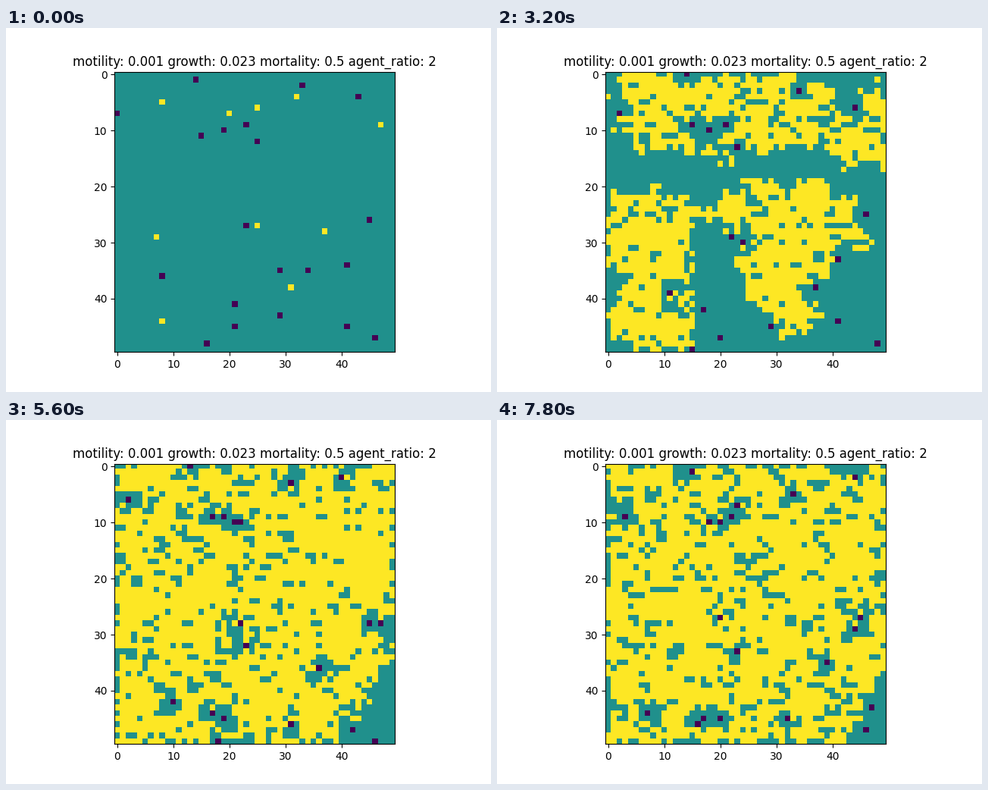
Recreate the animation shown at these times as a matplotlib script. Size 640 by 480 pixels, loop 8 s.

```python
import matplotlib.pyplot as plt
import numpy as np
from matplotlib.animation import FuncAnimation

SIZE, FRAMES, INTERVAL = 50, 40, 200
TITLE = "motility: 0.001 growth: 0.023 mortality: 0.5 agent_ratio: 2"

# Starting places (x, y)
FOUNDERS = [(8, 5), (32, 4), (25, 6), (20, 7), (47, 9),
            (25, 27), (37, 28), (7, 29), (31, 38), (8, 44)]
AGENTS = [(0, 7), (14, 1), (33, 2), (43, 4), (15, 11), (19, 10), (25, 12),
          (23, 9), (23, 27), (45, 26), (29, 35), (34, 35), (29, 43), (8, 36),
          (41, 34), (21, 41), (21, 45), (16, 48), (41, 45), (46, 47)]

SPREAD = 0.24        # chance that one neighbour fills an empty site
DEATH = 0.1
PAIR_DEATH = 0.4     # chance that a death takes the cell beside it too
EDGE_DEATH = 0.2
STEP = 0.28          # chance that an agent moves along an axis
SETTLE = 8           # founders survive until this step

rng = np.random.default_rng(11)
ys, xs = np.mgrid[:SIZE, :SIZE]


def chance(p):
    return rng.random((SIZE, SIZE)) < p


def distances(points):
    return np.min([np.hypot(xs - x, ys - y) for x, y in points], axis=0)


def wander(agents):
    moves = rng.choice([-1, 0, 1], agents.shape, p=[STEP / 2, 1 - STEP, STEP / 2])
    return np.clip(agents + moves, 0, SIZE - 1)


def neighbours(cells):
    p = np.pad(cells.astype(int), 1)
    return sum(p[dy:dy + SIZE, dx:dx + SIZE]
               for dy in range(3) for dx in range(3) if (dy, dx) != (1, 1))


def grow(cells, t):
    reach = 19 * (1 - np.exp(-t / 22)) + 0.3
    fill = chance(1 - (1 - SPREAD) ** neighbours(cells))
    return cells | (fill & (range_needed < reach))


def decay(cells):
    dead = chance(DEATH)
    dead[:, 1:] |= dead[:, :-1] & chance(PAIR_DEATH)[:, 1:]
    return cells & ~dead & ~(border & chance(EDGE_DEATH))


def hunt(cells, agents):
    d = distances(agents)
    return cells & ~chance(np.where(d < 1.5, 0.65, np.where(d < 2.3, 0.3, 0)))


def simulate():
    agents = np.array(AGENTS)
    cells = founders.copy()
    grids = []
    for t in range(FRAMES):
        if t > 0:
            agents = wander(agents)
            cells = hunt(decay(grow(cells, t)), agents)
        if t < SETTLE:
            cells |= founders
        cells[agents[:, 1], agents[:, 0]] = False
        grid = cells.astype(int)
        grid[agents[:, 1], agents[:, 0]] = -1
        grids.append(grid)
    return grids


founders = distances(FOUNDERS) == 0
range_needed = distances(FOUNDERS) + rng.normal(0, 1, (SIZE, SIZE))
border = (xs % (SIZE - 1) == 0) | (ys % (SIZE - 1) == 0)
grids = simulate()

fig, ax = plt.subplots(figsize=(6.4, 4.8), dpi=100)
ax.set_title(TITLE)
image = ax.imshow(grids[0], cmap="viridis", vmin=-1, vmax=1,
                  interpolation="nearest")


def update(i):
    image.set_data(grids[i])
    return [image]


anim = FuncAnimation(fig, update, frames=FRAMES, interval=INTERVAL,
                     repeat=True, repeat_delay=0)
plt.show()
```
